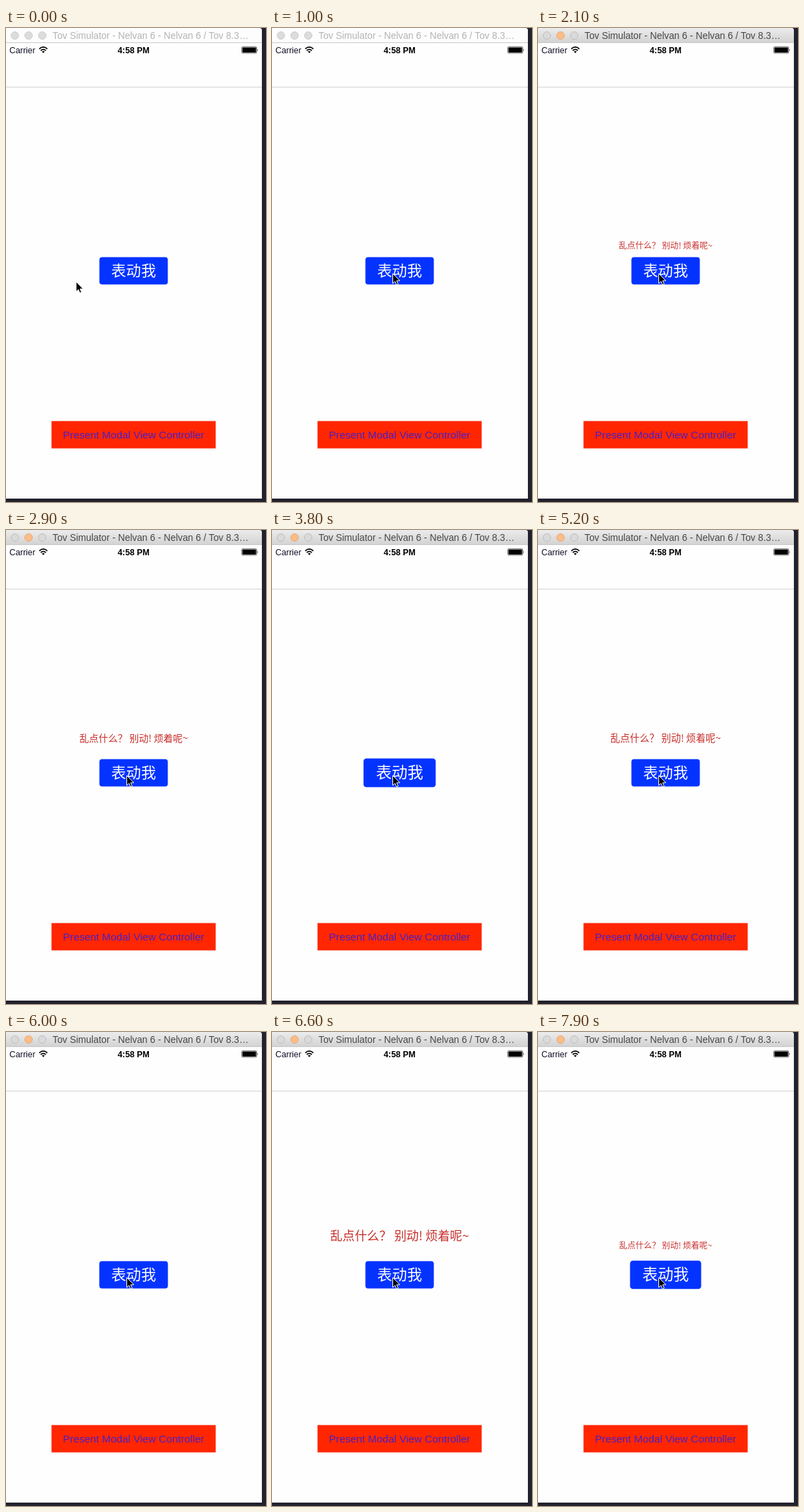
Animation of 380x694 px, one loop 8 s. Source, as an HTML page:

```html
<!DOCTYPE html>
<html lang="zh">
<head>
<meta charset="utf-8">
<title>Spring button</title>
<style>
  html, body { margin: 0; width: 100%; height: 100%; overflow: hidden; background: #22222e; }
  svg { display: block; width: 380px; height: 694px; }
  text { font-family: "Liberation Sans", Arial, sans-serif; }
  .cjk { font-family: "Noto Sans CJK SC", "Noto Sans CJK", sans-serif; text-anchor: middle; }
  .mid { text-anchor: middle; }
  #bar { fill: #fdfdfd; }
  #name { fill: #b4b4b4; }
  #lights circle { fill: #dcdcdc; stroke: #cdcdcd; }
  .active #bar { fill: url(#metal); }
  .active #name { fill: #484848; }
  .active #lights circle { fill: #dadada; stroke: #bebebe; }
  .active #lights .warm { fill: #fcbd87; stroke: #e5a877; }
</style>
</head>
<body>
<svg id="stage" viewBox="0 0 380 694">
  <defs>
    <linearGradient id="metal" x2="0" y2="1">
      <stop stop-color="#ececec"/><stop offset="1" stop-color="#d3d3d3"/>
    </linearGradient>
  </defs>
  <rect width="380" height="694" fill="#22222e"/>
  <path d="M0 0H370Q374 0 374 4V689H0Z" fill="#fefefe"/>
  <path id="bar" d="M0 0H370Q374 0 374 4V21H0Z"/>
  <path d="M0 21.5H374" stroke="#c9c9c9"/>
  <g id="lights">
    <circle cx="13" cy="11" r="5.5"/><circle class="warm" cx="33" cy="11" r="5.5"/><circle cx="53" cy="11" r="5.5"/>
  </g>
  <text id="name" x="68" y="16" font-size="13.8">Tov Simulator - Nelvan 6 - Nelvan 6 / Tov 8.3…</text>

  <text x="5" y="37" font-size="12.4" fill="#101028">Carrier</text>
  <g fill="none" stroke="#000" stroke-width="1.7">
    <path d="M48.6 30.6Q54.5 25.2 60.4 30.6M50.8 33Q54.5 29.6 58.2 33"/>
  </g>
  <path d="M52.4 34.6Q54.5 32.8 56.6 34.6L54.5 36.8Z"/>
  <text class="mid" x="186.5" y="37" font-size="12.3" font-weight="bold">4:58 PM</text>
  <rect x="344.5" y="27.5" width="22" height="9.5" rx="1.5" fill="none" stroke="#555" stroke-width=".8"/>
  <rect x="345.5" y="28.5" width="20" height="7.5" rx=".8"/>
  <path d="M367.5 30.5Q369 32.2 367.5 34Z"/>
  <path d="M0 86.5H374" stroke="#d2d2d2"/>

  <g id="label"><text class="cjk" y="5.2" font-size="14" fill="#c62f2b">乱点什么？ 别动! 烦着呢~</text></g>
  <g id="button">
    <rect x="-50" y="-20" width="100" height="40" rx="4" fill="#0433ff"/>
    <text class="cjk" y="7.4" font-size="21.8" fill="#fff">表动我</text>
  </g>
  <rect x="66.5" y="575.5" width="240" height="40" fill="#ff2600"/>
  <text class="mid" x="186.5" y="601" font-size="15.3" fill="#4a20c4">Present Modal View Controller</text>

  <path id="cursor" d="M.5 .5V15L3.8 11.9L6 17L8.4 16L6.2 11H10.8Z" stroke="#fff" stroke-width="1"/>
</svg>
<script>
const LOOP = 8, PRESS = .05, DELAY = .95, HIDE = .3;
const TAPS = [1.055, 3.1, 3.66, 5.47, 7.865];
const FREQ = 18.5, SOFT = .527, BOUNCY = .349;
const CENTER = 186.5, BUTTON_Y = 355.5, LABEL_Y = 305;
const $ = id => document.getElementById(id);
const clamp = x => Math.min(1, Math.max(0, x));
const mix = (a, b, k) => a + (b - a) * k;
const smooth = x => x * x * (3 - 2 * x);

// Offset from rest of a damped spring
function spring(t, damping, start, speed = 0) {
  const decay = damping * FREQ, w = FREQ * Math.sqrt(1 - damping * damping);
  return Math.exp(-decay * t) * (start * Math.cos(w * t) + (speed + decay * start) / w * Math.sin(w * t));
}

function place(id, x, y, scale = 1) {
  $(id).setAttribute('transform', `translate(${x} ${y}) scale(${scale})`);
}

function buttonScale(t, last) {
  const next = TAPS.find(tap => tap > t);
  if (next - t < PRESS) return 1 - .05 * (1 - (next - t) / PRESS);
  return last < 0 ? 1 : 1 + spring(t - TAPS[last], BOUNCY, -.05, 3);
}

// Progress of the label from behind the button: [position, scale]
function labelState(t, last) {
  if (last < 0) return [0, 0];
  const since = t - TAPS[last];
  if (since >= DELAY) return [SOFT, BOUNCY].map(d => 1 + spring(since - DELAY, d, -1));
  const wasShown = last > 0 && TAPS[last] - TAPS[last - 1] > DELAY;
  const k = wasShown ? 1 - smooth(clamp(since / HIDE) ** .65) : 0;
  return [k, k];
}

function draw(t) {
  const last = TAPS.filter(tap => tap <= t).length - 1;
  const [rise, grow] = labelState(t, last);
  const move = smooth(clamp((t - .05) / .85));
  $('stage').classList.toggle('active', t >= TAPS[0] - PRESS);
  place('button', CENTER, BUTTON_Y, buttonScale(t, last));
  place('label', CENTER, mix(BUTTON_Y, LABEL_Y, rise), mix(.1, 1, grow));
  place('cursor', mix(102, 176, move), mix(371, 359, move));
}

const start = performance.now();
function tick() {
  draw((performance.now() - start) / 1000 % LOOP);
  requestAnimationFrame(tick);
}
tick();
</script>
</body>
</html>
```
